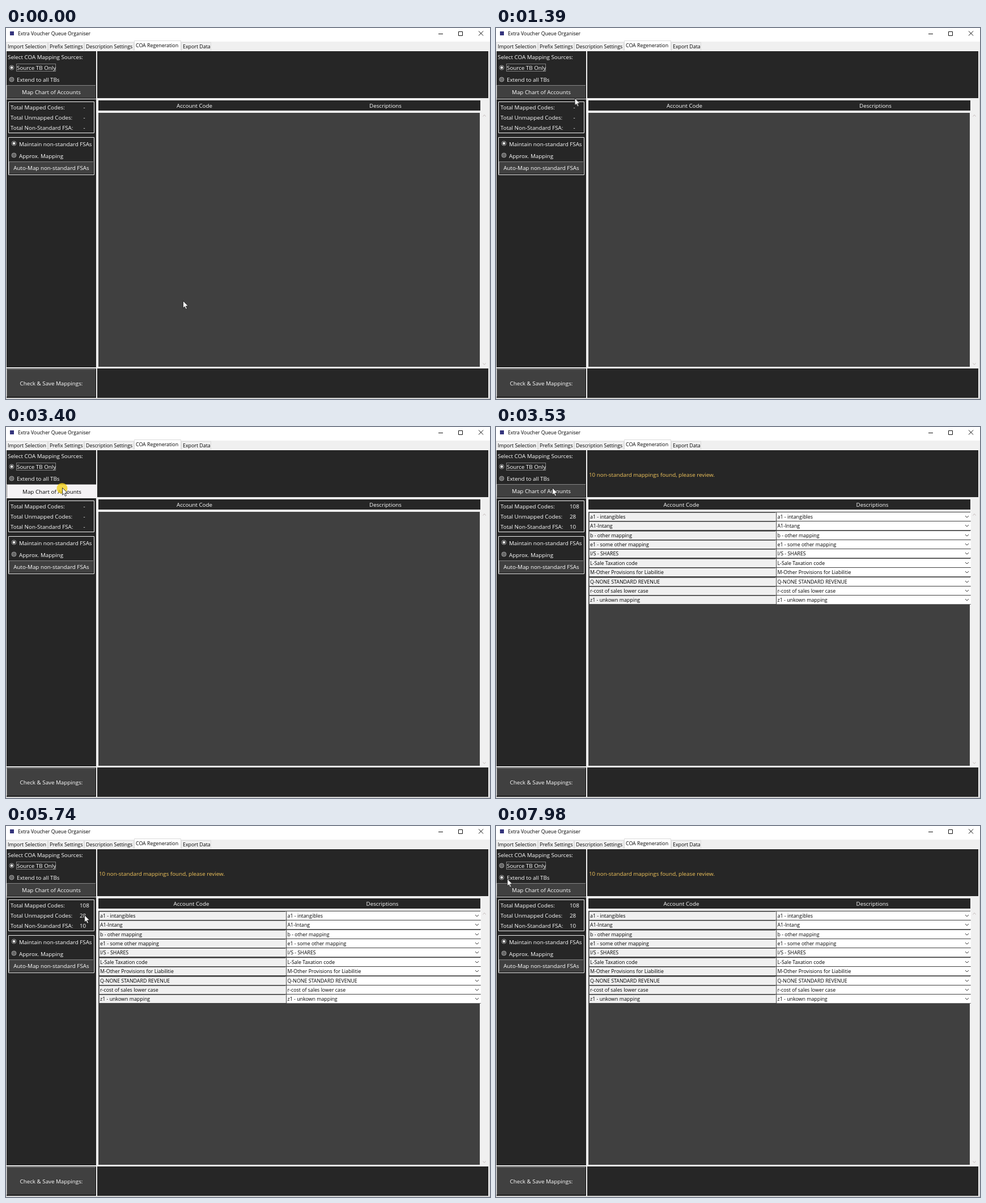
These frames come from a looping animation (854 px wide and 656 px high, 8 s). An HTML page:

```html
<!DOCTYPE html>
<html lang="en">
<head>
<meta charset="utf-8">
<title>Extra Voucher Queue Organiser</title>
<style>
  html, body { margin: 0; width: 100%; height: 100%; overflow: hidden; background: #f0f0f0; }
  svg { display: block; width: 854px; height: 656px; font-family: "Open Sans", "Noto Sans", sans-serif; }
  text { white-space: pre; }
  .before, .after, .down, .source, .extend, .halo { animation: 8s step-end infinite; }
  .before { animation-name: before; }
  .after { animation-name: after; }
  .down { animation-name: down; }
  .source { animation-name: source; }
  .extend { animation-name: extend; }
  .halo { animation-name: halo; }
  #cursor { animation: move 8s linear infinite; }

  @keyframes before { 0% { opacity: 1 } 44.1%, 100% { opacity: 0 } }
  @keyframes after { 0% { opacity: 0 } 44.1%, 100% { opacity: 1 } }
  @keyframes down { 0% { opacity: 0 } 42.48% { opacity: 1 } 43.5%, 100% { opacity: 0 } }
  @keyframes source { 0% { opacity: 1 } 93.25%, 100% { opacity: 0 } }
  @keyframes extend { 0% { opacity: 0 } 93.25%, 100% { opacity: 1 } }
  @keyframes halo {
    0% { opacity: 0 } 42.48% { opacity: .8 } 43.5% { opacity: 0 }
    92.25% { opacity: .8 } 93.25%, 100% { opacity: 0 }
  }
  @keyframes move {
    0%, 1% { transform: translate(312px, 482px) }
    2.6%, 6.1% { transform: translate(311px, 481px); animation-timing-function: ease-in }
    8% { transform: translate(318px, 470px) }
    11.5% { transform: translate(240px, 290px); animation-timing-function: ease-out }
    15.75%, 16.3% { transform: translate(160px, 157px) }
    17.37% { transform: translate(139px, 124px); animation-timing-function: ease-out }
    22% { transform: translate(64px, 64px) }
    24% { transform: translate(59px, 61px) }
    26.4%, 26.75% { transform: translate(60px, 67px) }
    30.4% { transform: translate(76px, 82px); animation-timing-function: ease-out }
    35% { transform: translate(102px, 105px) }
    36.4%, 37% { transform: translate(101px, 106px) }
    38.4%, 45.1% { transform: translate(99px, 107px); animation-timing-function: ease-in-out }
    52.1%, 52.75% { transform: translate(141px, 155px) }
    55.1%, 59.25% { transform: translate(141px, 157px); animation-timing-function: ease-in-out }
    66.25%, 69.75% { transform: translate(139px, 170px) }
    71.75% { transform: translate(138px, 157px); animation-timing-function: ease-in-out }
    79.4%, 80% { transform: translate(32px, 88px) }
    82% { transform: translate(18px, 86px) }
    84%, 97.1% { transform: translate(9px, 91px); animation-timing-function: ease-out }
    99.75%, 100% { transform: translate(19.5px, 93px) }
  }
</style>
</head>
<body>
<svg id="stage" viewBox="0 0 854 656"></svg>
<script>
const DARK = '#262626', GREY = '#404040', LIGHT = '#f0f0f0', SMALL = 8.85, BODY = 9.8;

const rect = (x, y, w, h, fill) => `<rect x="${x}" y="${y}" width="${w}" height="${h}" fill="${fill}"/>`;
const line = (d, color, width = 1) => `<path d="${d}" fill="none" stroke="${color}" stroke-width="${width}"/>`;
const frame = (x, y, w, h, color) => line(`M${x + .5} ${y + .5}h${w - 1}v${h - 1}h${1 - w}z`, color);
const group = (name, ...parts) => `<g class="${name}">${parts.join('')}</g>`;

// Text is placed by the vertical middle of its capitals.
const label = (text, x, mid, { size = BODY, fill = '#fff', anchor = 'start' } = {}) =>
  `<text x="${x}" y="${Math.round(mid + size * .36)}" font-size="${size}" fill="${fill}" text-anchor="${anchor}">${text.replace('&', '&amp;')}</text>`;
const centred = (text, x, mid) => label(text, x, mid, { anchor: 'middle' });

const button = (text, x, y, w, h) =>
  rect(x, y, w, h, GREY) +
  line(`M${x} ${y + .5}h${w}M${x + .5} ${y}v${h}`, '#858585') +
  line(`M${x} ${y + h - .5}h${w}M${x + w - .5} ${y}v${h}`, '#151515') +
  centred(text, x + w / 2, y + h / 2);

const radio = (x, y) => `<circle cx="${x}" cy="${y}" r="4" fill="#666" stroke="#9a9a9a"/>`;
const dot = (x, y) => `<circle cx="${x}" cy="${y}" r="3.3" fill="#333"/><circle cx="${x}" cy="${y}" r="2.2" fill="#fff"/>`;

function titleBar() {
  return rect(0, 0, 854, 24, '#fff') + rect(7, 6, 7, 7, '#34347c') +
    label('Extra Voucher Queue Organiser', 21, 10, { size: 8.7, fill: '#000' }) +
    line('M763 10.5h8', '#111') + frame(798, 6, 8, 8, '#111') +
    line('M834 5.5l8 8M842 5.5l-8 8', '#111');
}

function tabs() {
  const items = [['Import Selection', 0, 74], ['Prefix Settings', 74, 64], ['Description Settings', 138, 88],
    ['COA Regeneration', 226, 83], ['Export Data', 309, 53]];
  return items.map(([text, x, w], i) => {
    const active = i === 3, y = active ? 22 : 25;
    return rect(x, y, w, 40 - y, active ? '#fff' : LIGHT) + frame(x, y, w, 41 - y, '#dcdcdc') +
      label(text, x + 3, active ? 31 : 32.5, { size: SMALL, fill: '#000' });
  }).join('');
}

function panels() {
  return rect(1, 41, 158, 84, DARK) + rect(1, 126, 158, 474, DARK) + rect(1, 602, 158, 52, DARK) +
    rect(161, 41, 690, 83, DARK) + rect(161, 602, 690, 52, DARK) +
    rect(163, 128, 674, 18, DARK) + rect(163, 150, 673, 449, GREY) +
    line('M162.5 127v472M0 40.5h852', '#fff') +
    line('M841.5 156.5l2.5-3l2.5 3M841.5 592.5l2.5 3l2.5-3', '#c5bcbc') +
    line('M0 655.5h854M853.5 41v615', '#c4c4c4');
}

function sidebar() {
  const totals = ['Total Mapped Codes:', 'Total Unmapped Codes:', 'Total Non-Standard FSA:'];
  const counts = ['108', '28', '10'];
  const mid = i => 140.5 + i * 18;
  return label('Select COA Mapping Sources:', 3, 51) +
    radio(10, 70) + radio(10, 91) + group('source', dot(10, 70)) + group('extend', dot(10, 91)) +
    label('Source TB Only', 19, 70.5) + label('Extend to all TBs', 19, 91.5) +
    '<rect x="18.5" y="63.5" width="69" height="13" fill="none" stroke="#ddd" stroke-dasharray="1 1"/>' +
    button('Map Chart of Accounts', 1, 101, 158, 24) +
    group('down', rect(1, 101, 158, 24, '#f4f2f4'), line('M1 101.5h158M1.5 101v24', '#777'),
      label('Map Chart of Accounts', 81, 114, { fill: '#000', anchor: 'middle' })) +
    frame(4, 130, 152, 56, LIGHT) + frame(4, 193, 152, 67, LIGHT) +
    totals.map((text, i) => label(text, 8, mid(i))).join('') +
    group('before', ...counts.map((_, i) => centred('-', 138, mid(i)))) +
    group('after', ...counts.map((n, i) => label(n, 130, mid(i)))) +
    radio(14, 204) + dot(14, 204) + radio(14, 225) +
    label('Maintain non-standard FSAs', 23, 205) + label('Approx. Mapping', 23, 226) +
    button('Auto-Map non-standard FSAs', 5, 236, 150, 23) +
    button('Check & Save Mappings:', 1, 603, 158, 50);
}

function results() {
  const codes = ['a1 - intangibles', 'A1-Intang', 'b - other mapping', 'e1 - some other mapping', 'I/S - SHARES',
    'L-Sale Taxation code', 'M-Other Provisions for Liabilitie', 'Q-NONE STANDARD REVENUE',
    'r-cost of sales lower case', 'z1 - unkown mapping'];
  const style = { size: SMALL, fill: '#000' };
  const rows = codes.map((code, i) => {
    const y = Math.round(150 + i * 16.37), mid = y + 8.5;
    return rect(163, y, 674, 17, GREY) + rect(164, y + 2, 329, 14, LIGHT) +
      line(`M164 ${y + 1.5}h330M164.5 ${y + 1}v15`, '#777') + line(`M493.5 ${y + 1}v15`, '#fff') +
      rect(495, y + 1, 343, 15, '#fff') + line(`M495 ${y + 16.5}h343`, '#777') +
      label(code, 166, mid, style) + label(code, 496.5, mid, style) +
      line(`M828 ${mid - 1.5}l3 3l3-3`, '#333');
  });
  return group('before', centred('Account Code', 332.5, 137.5), centred('Descriptions', 669.5, 137.5)) +
    group('after', centred('Account Code', 327, 137.5), centred('Descriptions', 664, 137.5),
      label('10 non-standard mappings found, please review.', 164, 84, { fill: '#f3c65c' }), ...rows);
}

const cursor = `<g id="cursor"><circle class="halo" cy="1.5" r="9.5" fill="#f2d01c"/>
  <path d="M.5 .5V13.2L3.3 10.6L5.4 15.2L7.5 14.3L5.4 9.8H9.5Z" fill="#fff" stroke="#111" stroke-width=".8"/></g>`;

document.getElementById('stage').innerHTML =
  rect(0, 0, 854, 656, LIGHT) + titleBar() + tabs() + panels() + sidebar() + results() + cursor;
</script>
</body>
</html>
```
